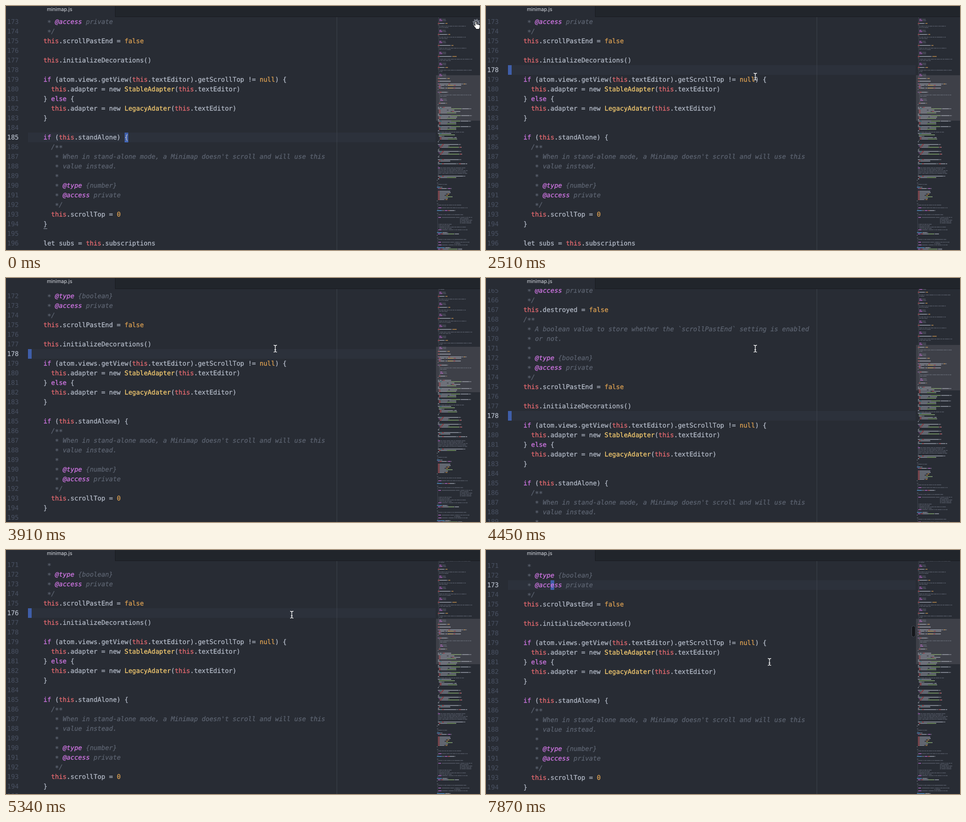
Animation of 1035 by 532 pixels, one loop 8 s. Source, as an HTML page with a canvas:

```html
<!DOCTYPE html>
<html lang="en">
<head>
<meta charset="utf-8">
<title>Minimap settings</title>
<style>
html, body { margin: 0; width: 100%; height: 100%; overflow: hidden; background: #282c34; }
#stage { position: relative; width: 1035px; height: 532px; overflow: hidden; background: #282c34; color: #b3bac7;
  font: 14px/21px "DejaVu Sans Mono", monospace; text-rendering: geometricPrecision; }
#stage div, #stage canvas, #stage svg, pre { position: absolute; margin: 0; }
pre { font: inherit; }
#tabs { left: 0; top: 0; width: 1035px; height: 24px; }
#tabs, .menu { font: 11px/22px Inter, sans-serif; }
#rest { left: 238px; right: 0; height: 23px; background: #21252b; border-left: 1px solid #181a1f; border-bottom: 1px solid #181a1f; }
#title { left: 0; width: 234px; top: -4px; text-align: center; color: #d7dae0; }
#editor { left: 0; top: 24px; width: 1035px; height: 508px; overflow: hidden; }
#scroller { left: 0; top: 0; width: 939px; height: 508px; }
#code { left: 48px; -webkit-text-stroke: .3px; }
#code .star { position: relative; top: 2px; }
#gutter { left: 2.5px; color: #495162; }
#gutter .now { color: #b3bac7; -webkit-text-stroke: .3px; }
#stripe { left: 48px; width: 890px; height: 21px; background: #2c313b; }
#block { width: 8.43px; height: 21px; background: #3f5ea9; }
.mark { width: 8.43px; height: 1px; }
#guide { left: 722px; top: 0; width: 1px; height: 508px; background: #3d424c; }
#map { left: 939px; }
#view { left: 939px; width: 96px; height: 99px; background: rgba(172, 165, 172, .16); }
#thumb { left: 929px; top: 141px; width: 7px; height: 23px; border: 1px solid #454a54; border-radius: 5px; background: #15171b; }
.menu { left: 739px; top: 23px; width: 199px; height: 208px; border-radius: 4px; background: #21252b; box-shadow: 0 1px 6px rgba(0, 0, 0, .45); color: #a3aab7; }
.item { left: 4px; width: 192px; height: 22px; text-indent: 23.5px; }
.item.on { text-indent: 25px; }
.item svg { left: 4px; top: 6px; display: none; }
.item.on svg { display: block; }
.item.hover { background: #2c313a; }
.item.chosen { background: #3a3f4b; color: #d7dae0; }
.line { left: 0; top: 135px; width: 199px; height: 1px; background: #1a1d22; }
.button { top: 180px; width: 94px; height: 22px; border: 1px solid #181a1f; box-sizing: content-box; text-align: center; background: linear-gradient(#3c414c, #353a44); }
.button.on { background: #528bff; color: #fff; }
#overlay { left: 0; top: 0; }
</style>
</head>
<body>
<div id="stage">
  <div id="tabs"><div id="rest"></div><div id="title">minimap.js</div></div>
  <div id="editor">
    <div id="scroller">
      <div id="stripe"></div>
      <div id="block"></div>
      <div class="mark" style="background:#528bff"></div>
      <div class="mark" style="background:#a0a8b6"></div>
      <div id="gutter"></div>
      <pre id="code"></pre>
    </div>
    <div id="guide"></div>
    <canvas id="map"></canvas>
    <div id="view"></div>
    <div id="thumb"></div>
  </div>
  <div class="menu" id="menu"></div>
  <svg id="overlay" width="1035" height="532" fill="none">
    <g id="gear" stroke="#747a86" transform="translate(1027 36)">
      <circle r="4.3" stroke-width="3.6"/>
      <circle r="6.8" stroke-width="2.6" stroke-dasharray="2.7 2.64"/>
    </g>
    <path id="hand" fill="#fff" stroke="#111" d="M-1.6 1Q0-1 1.6 1V6Q3 5 4.2 6.3Q5.8 5.6 6.8 7Q8.6 6.6 8.8 8.5V11Q8.8 13 7.5 15V16.5H0V15Q-3 11.5-5 8.5Q-4.6 6.6-3 7.6L-1.6 9Z"/>
    <path id="arrow" fill="#111" stroke="#fff" d="M.5 .5V14L3.6 11.2L5.8 16.3L8 15.3L5.8 10.4H10Z"/>
    <path id="beam" stroke="#fff" stroke-width="1.3" d="M-3.5-7.5Q0-7.5 0-5V5Q0 7.5-3.5 7.5M3.5-7.5Q0-7.5 0-5M3.5 7.5Q0 7.5 0 5M-1.8 2.5H1.8"/>
  </svg>
</div>
<script>
const FIRST = 124, TOP = 173, ROW = 21, COL = 8.43, LEFT = 48, LOOP = 8000;
const $ = id => document.getElementById(id);

const property = (about, more, type, code) => `    /**
     * ${about}
     * ${more}
     *
     * @type {${type}}
     * @access private
     */
    ${code}
`;

const source = `     * @type {number}
     * @access private
     */
    this.charHeight = null
` +
property('The width of a single character as it is drawn in the minimap canvas',
  'by default.', 'number', 'this.charWidth = null') +
property('The height of the gap between two lines of this minimap as',
  'set in the settings.', 'number', 'this.configInterline = null') +
property('The pixel ratio that is read from the configuration if any',
  'such value exists.', 'number', 'this.configDevicePixelRatio = null') +
property('Whether the ratio of the device pixels has to be rounded or',
  'left as it is by default.', 'boolean', 'this.devicePixelRatioRounding = undefined') +
property('A boolean value to store whether this Minimap have been destroyed or not',
  'at some point before now.', 'boolean', 'this.destroyed = false') +
property('A boolean value to store whether the `scrollPastEnd` setting is enabled',
  'or not.', 'boolean', 'this.scrollPastEnd = false') + `
    this.initializeDecorations()

    if (atom.views.getView(this.textEditor).getScrollTop != null) {
      this.adapter = new StableAdapter(this.textEditor)
    } else {
      this.adapter = new LegacyAdater(this.textEditor)
    }

    if (this.standAlone) {
      /**
       * When in stand-alone mode, a Minimap doesn't scroll and will use this
       * value instead.
       *
       * @type {number}
       * @access private
       */
      this.scrollTop = 0
    }

    let subs = this.subscriptions
    subs.add(atom.config.observe('editor.scrollPastEnd', (scrollPastEnd) => {
      this.scrollPastEnd = scrollPastEnd
      this.adapter.scrollPastEnd = this.scrollPastEnd
      this.emitter.emit('did-change-config')
    }))
    subs.add(atom.config.observe('minimap.charHeight', (configCharHeight) => {
      this.configCharHeight = configCharHeight
      this.emitter.emit('did-change-config')
    }))
    subs.add(atom.config.observe('minimap.charWidth', (configCharWidth) => {
      this.configCharWidth = configCharWidth
      this.emitter.emit('did-change-config')
    }))
    subs.add(atom.config.observe('minimap.interline', (configInterline) => {
      this.configInterline = configInterline
      this.emitter.emit('did-change-config')
    }))
    // the setting below is read only when rounding the ratio
    subs.add(atom.config.observe(
      'minimap.devicePixelRatioRounding',
      (ratio) => {
        this.devicePixelRatioRounding = ratio
        this.emitter.emit('did-change-config')
      }
    ))

    subs.add(this.adapter.onDidChangeScrollTop(() => {
      if (!this.standAlone) {
        this.emitter.emit('did-change-scroll-top', this)
      }
    }))
    subs.add(this.adapter.onDidChangeScrollLeft(() => {
      if (!this.standAlone) {
        this.emitter.emit('did-change-scroll-left', this)
      }
    }))

    subs.add(this.textEditor.onDidChange((changes) => {
      this.emitChanges(changes)
    }))
    subs.add(this.textEditor.onDidDestroy(() => { this.destroy() }))

    /*
    FIXME Some changes occuring during the tokenization produces
    ranges that deceive the canvas rendering by making some
    lines at the end of the buffer intact while they are in fact not,
    resulting in extra lines appearing at the end of the minimap.
    Forcing a whole repaint to fix that bug is suboptimal but works.
    */
    subs.add(this.textEditor.displayBuffer.onDidTokenize(() => {
      this.emitter.emit('did-change-config')
    }))
  }

  /**
   * Destroys the model.
   */
  destroy () {
    if (this.destroyed) { return }

    this.removeAllDecorations()
    this.subscriptions.dispose()
    this.subscriptions = null
    this.textEditor = null
    this.emitter.emit('did-destroy')
    this.emitter.dispose()
    this.destroyed = true
  }

  /**
   * Returns true when this Minimap has been destroyed.
   *
   * @return {boolean} whether this Minimap has been destroyed or not
   */
  isDestroyed () { return this.destroyed }

  /**
   * Registers an event listener to the \`did-change\` event.
   *
   * @param  {function(event:Object):void} callback a function to call when the
   *                                                event is triggered.
   *                                                the callback will be called
   *                                                with an event object with
   *                                                the following properties:
   * - start: The start row number
   * - end: The end row number
   * - screenDelta: the delta in buffer rows between the versions
   *   before and after the change
   * @return {Disposable} a disposable to stop listening to the event
   */
  onDidChange (callback) {
    return this.emitter.on('did-change', callback)
  }

  /**
   * Registers an event listener to the \`did-change-config\` event.
   *
   * @param  {function():void} callback a function to call when the event
   *                                    is triggered.
   * @return {Disposable} a disposable to stop listening to the event
   */
  onDidChangeConfig (callback) {
    return this.emitter.on('did-change-config', callback)
  }`;

const color = { plain: '#b3bac7', comment: '#5c6370', star: '#5c6370', string: '#98c379', self: '#e66a70', keyword: '#d277e6',
  constant: '#dca052', type: '#f5cb70', add: '#56b6c2', method: '#61afef' };
const codeToken = /(?<string>'[^']*')|(?<self>\bthis\b)|(?<keyword>\b(?:if|else|return)\b)|(?<constant>\b(?:false|true|null|undefined|0)\b)|(?<type>(?<=new )\w+)|(?<add>(?<=subs\.)add)|(?<method>^  \w+(?= \())/g;
const docToken = /(?<keyword>@\w+|FIXME)|(?<star>\*+)/g;

function tokenize(line, isComment) {
  const rest = isComment ? 'comment' : 'plain', tokens = [];
  let end = 0;
  for (const m of line.matchAll(isComment ? docToken : codeToken)) {
    tokens.push([line.slice(end, m.index), rest]);
    tokens.push([m[0], Object.keys(m.groups).find(k => m.groups[k])]);
    end = m.index + m[0].length;
  }
  tokens.push([line.slice(end), rest]);
  return tokens;
}

function add(parent, tag, className, text = '') {
  const node = document.createElement(tag);
  node.className = className;
  node.textContent = text;
  return parent.appendChild(node);
}

const lines = source.split('\n');
const map = $('map');
map.width = 96;
map.height = lines.length * 3;
const ink = map.getContext('2d');
ink.globalAlpha = .62;
let inside = false;
lines.forEach((line, i) => {
  const text = line.trim();
  if (text.startsWith('/*') || i === 0) inside = true;
  const isComment = inside || text.startsWith('//');
  let col = 0;
  for (const [part, kind] of tokenize(line, isComment)) {
    const span = add($('code'), 'span', kind, part);
    span.style.color = color[kind];
    if (isComment) span.style.fontStyle = 'italic';
    ink.fillStyle = color[kind];
    for (const char of part) {
      if (char !== ' ') ink.fillRect(col, i * 3, 1, 2);
      col++;
    }
  }
  $('code').append('\n');
  if (text.endsWith('*/')) inside = false;
  add($('gutter'), 'div', '', FIRST + i).style.top = i * ROW + 'px';
});
$('code').style.top = $('gutter').style.top = (FIRST - TOP) * ROW + 1 + 'px';

const labels = ['bookmarks', 'cursorline', 'find-and-replace', 'git-diff', 'linter', 'selection', 'code-highlights', 'absolute-mode'];
const items = labels.map((label, i) => {
  const item = add($('menu'), 'div', 'item' + (i > 1 && i < 7 ? ' on' : '') + (i ? '' : ' chosen'), label);
  item.style.top = 3 + i * 22 + (i > 5) + 'px';
  item.insertAdjacentHTML('beforeend', '<svg width="12" height="10" fill="none" stroke="#73c990" stroke-width="2.2"><path d="M1 5L4.2 8.2L10.5 1.5"/></svg>');
  return item;
});
add($('menu'), 'div', 'line');
add($('menu'), 'div', 'button', 'On Left').style.left = '4px';
add($('menu'), 'div', 'button on', 'On Right').style.left = '99px';

// Each step lists what changes at that time.
const steps = [
  [0, { scroll: 0, cursor: [185, 25], block: 1, marks: [[185, 25], [194, 4]], menu: 0, hover: 0, checked: 0, gear: 1, thumb: 0, mouse: ['hand', 1026, 34] }],
  [290, { menu: 1, block: 0 }],
  [590, { mouse: ['arrow', 1004, 40] }],
  [740, { mouse: ['arrow', 912, 58] }],
  [880, { mouse: ['arrow', 849, 66], hover: 1 }],
  [1030, { gear: 0 }],
  [1330, { checked: 1 }],
  [1630, { mouse: ['arrow', 790, 88], hover: 0 }],
  [1780, { mouse: ['beam', 660, 128] }],
  [1920, { mouse: ['beam', 588, 146] }],
  [2060, { menu: 0, cursor: [178, 0], block: 1, marks: [] }],
  [2510, { mouse: ['beam', 588, 154] }],
  [3560, { scroll: 3 }],
  [3730, { scroll: 11 }],
  [3910, { scroll: 26 }],
  [4090, { scroll: 67 }],
  [4270, { scroll: 124 }],
  [4450, { scroll: 161 }],
  [4660, { scroll: 132 }],
  [4860, { scroll: 70 }],
  [5050, { scroll: 40, mouse: ['beam', 624, 141] }],
  [5340, { cursor: [176, 0] }],
  [5630, { mouse: ['beam', 623, 172], thumb: 1 }],
  [5780, { mouse: ['beam', 620, 222] }],
  [5930, { mouse: ['beam', 619, 244] }],
  [6230, { cursor: [181, 12] }],
  [6380, { cursor: [181, 11], marks: [[181, 11], [183, 4]] }],
  [7120, { cursor: [180, 11], marks: [] }],
  [7720, { cursor: [178, 0] }],
  [7870, { cursor: [173, 11], scroll: 42 }]
];

const show = (node, on) => { node.style.visibility = on ? 'visible' : 'hidden'; };
const place = (node, [line, col], drop = 0) => {
  node.style.left = LEFT + col * COL + 'px';
  node.style.top = (line - TOP) * ROW + drop + 'px';
};

function render(s) {
  const moved = s.scroll / ROW;
  $('scroller').style.transform = `translateY(${s.scroll}px)`;
  map.style.top = Math.floor(127 + (FIRST - TOP) * 3 + 2.3 * moved) + 'px';
  $('view').style.top = 127 - .7 * moved + 'px';
  place($('block'), s.cursor);
  show($('block'), s.block);
  $('stripe').style.top = (s.cursor[0] - TOP) * ROW + 'px';
  [...$('gutter').children].forEach((n, i) => n.classList.toggle('now', FIRST + i === s.cursor[0]));
  document.querySelectorAll('.mark').forEach((node, i) => {
    show(node, s.marks[i]);
    if (s.marks[i]) place(node, s.marks[i], 20);
  });
  show($('menu'), s.menu);
  items[1].classList.toggle('hover', !!s.hover);
  items[1].classList.toggle('on', !!s.checked);
  show($('gear'), s.gear);
  show($('thumb'), s.thumb);
  const [kind, x, y] = s.mouse;
  for (const id of ['hand', 'arrow', 'beam']) show($(id), id === kind);
  $(kind).setAttribute('transform', `translate(${x} ${y})`);
}

let shown = -1;
const start = performance.now();
function tick(now) {
  const t = Math.max(0, now - start) % LOOP;
  const count = steps.filter(([at]) => at <= t).length;
  if (count !== shown) {
    shown = count;
    render(Object.assign({}, ...steps.slice(0, count).map(step => step[1])));
  }
  requestAnimationFrame(tick);
}
tick(start);
</script>
</body>
</html>
```
